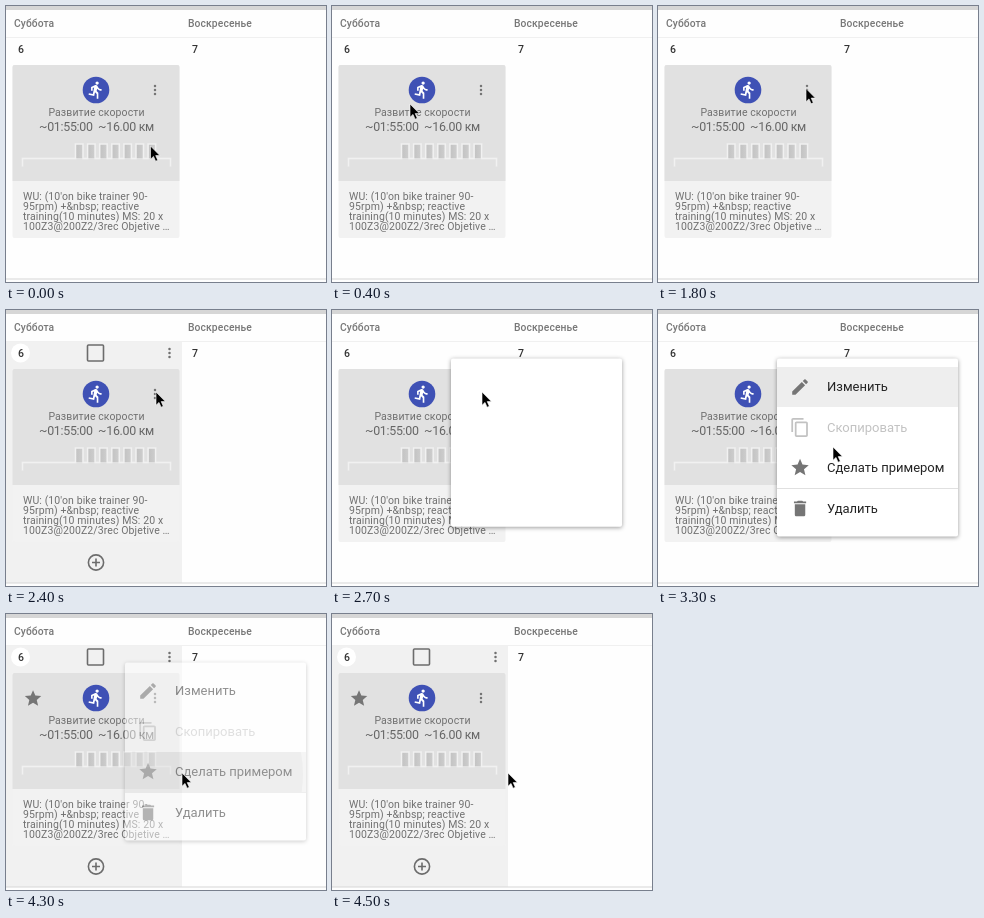
Animation, 320 px wide and 276 px high, one loop 4600 ms. Source, as an HTML page:

```html
<!DOCTYPE html>
<html lang="ru">
<head>
<meta charset="utf-8">
<title>Календарь тренировок</title>
<style>
html, body { margin: 0; width: 100%; height: 100%; overflow: hidden; background: #fefefe; }
svg { display: block; width: 320px; height: 276px; }
text { font-family: Roboto, "Open Sans", sans-serif; font-size: 10.5px; letter-spacing: .1px; fill: #707070; white-space: pre; }
.head { font-size: 10.3px; font-weight: 500; fill: #777; }
.day { font-weight: 500; fill: #333; }
.mid { text-anchor: middle; }
.time { font-size: 12.4px; letter-spacing: -.3px; fill: #666; }
#items text { font-size: 13px; letter-spacing: 0; fill: #242424; }
#items .off { fill: #c2c2c2; }
.icon { fill: #757575; }
#menuBox { filter: drop-shadow(0 1px 2px rgba(0,0,0,.4)); }
</style>
</head>
<body>
<svg viewBox="0 0 320 276">
  <defs>
    <path id="star" d="M12 17.27L18.18 21l-1.64-7.03L22 9.24l-7.19-.61L12 2 9.19 8.63 2 9.24l5.46 4.73L5.82 21z"/>
    <g id="dots"><circle cy="-4.1" r="1.25"/><circle r="1.25"/><circle cy="4.1" r="1.25"/></g>
    <clipPath id="row"><rect x="119" y="138" width="181" height="40"/></clipPath>
    <linearGradient id="barFill">
      <stop stop-color="#c2c2c2"/><stop offset="1" stop-color="#cecece"/>
    </linearGradient>
  </defs>

  <rect width="320" height="276" fill="#fefefe"/>
  <rect y="31" width="320" height="1" fill="#f0f0f0"/>
  <rect id="column" y="32" width="176" height="241" fill="#f1f1f1"/>
  <rect width="320" height="4" fill="#d6d6d6"/>
  <rect y="272.5" width="320" height="1" fill="#d8d8d8"/>
  <text class="head" x="8" y="21">Суббота</text>
  <text class="head" x="182" y="21">Воскресенье</text>
  <circle id="badge" cx="14.5" cy="43" r="9.5" fill="#fff"/>
  <text class="day" x="12" y="46.5">6</text>
  <text class="day" x="186" y="46.5">7</text>

  <g id="tools" fill="none" stroke="#6c6c6c" stroke-width="1.6">
    <rect x="81.5" y="35" width="16" height="16" rx="1"/>
    <use href="#dots" x="163.5" y="43" fill="#707070" stroke="none"/>
    <circle cx="90" cy="252.5" r="7.6"/>
    <path d="M86 252.5h8M90 248.5v8"/>
  </g>

  <rect x="6.5" y="59" width="167" height="173" rx="2" fill="#f2f2f2"/>
  <path d="M6.5 175V61q0-2 2-2H171.5q2 0 2 2V175z" fill="#e1e1e1"/>
  <circle cx="90" cy="84" r="13.3" fill="#3f51b5"/>
  <path transform="translate(80.2 74.2) scale(.81)" fill="#fff" d="M13.49 5.48c1.1 0 2-.9 2-2s-.9-2-2-2-2 .9-2 2 .9 2 2 2zm-3.6 13.9l1-4.4 2.1 2v6h2v-7.5l-2.1-2 .6-3c1.3 1.5 3.3 2.5 5.5 2.5v-2c-1.9 0-3.5-1-4.3-2.4l-1-1.6c-.4-.6-1-1-1.7-1-.3 0-.5.1-.8.1l-5.2 2.2v4.7h2v-3.4l1.8-.7-1.6 8.1-4.9-1-.4 2 7 1.4z"/>
  <circle id="ripple" cx="147" cy="84" r="18.5"/>
  <use href="#dots" x="149" y="84" class="icon"/>
  <use id="cardStar" href="#star" class="icon" transform="translate(17.2 74.5) scale(.82)"/>
  <text class="mid" x="90.5" y="110">Развитие скорости</text>
  <text class="mid time" x="90.5" y="125">~01:55:00  ~16.00 км</text>
  <g id="chart"></g>
  <g id="notes"></g>

  <g id="menu">
    <rect id="menuBox" x="119" y="48.5" width="181" height="178" rx="2" fill="#fff"/>
    <g id="items">
      <rect id="hoverEdit" x="119" y="57" width="181" height="40" fill="#eee"/>
      <rect id="hoverStar" x="119" y="138" width="181" height="40" fill="#eee"/>
      <g clip-path="url(#row)"><circle id="press" cx="177" cy="160" opacity=".06"/></g>
      <rect x="119" y="178" width="181" height="1" fill="#e0e0e0"/>
    </g>
  </g>
  <g id="cursor">
    <path id="arrow" fill="#000" stroke="#fff" stroke-width=".6" d="M0 0V13.2L3 10.4 5.1 15.2 7.3 14.3 5.2 9.6H9.4z"/>
    <path id="hand" fill="#fff" stroke="#111" stroke-width="1" stroke-linejoin="round" d="M-1.3 7V1Q0-.8 1.3 1V5.2Q2.7 4.2 3.7 5.8 5.2 4.9 6 6.5 7.8 6 8 8V11L6.3 15H-1.7L-5 10.3Q-5.3 8.2-3.4 8.6L-1.3 10.4zM1.3 5.2V8M3.7 5.8V8.4M6 6.5V8.8"/>
  </g>
</svg>
<script>
const LOOP = 4600, STEP = 100;
const NS = "http://www.w3.org/2000/svg";
const $ = id => document.getElementById(id);

function add(parent, tag, attrs, text) {
  const el = document.createElementNS(NS, tag);
  for (const key in attrs) el.setAttribute(key, attrs[key]);
  if (text) el.textContent = text;
  parent.append(el);
}

["WU: (10'on bike trainer 90-", "95rpm) +&nbsp; reactive", "training(10 minutes) MS: 20 x", "100Z3@200Z2/3rec Objetive …"]
  .forEach((line, i) => add($("notes"), "text", { x: 17, y: 193.5 + i * 10.1 }, line));

[
  ["Изменить", 77, "M3 17.25V21h3.75L17.81 9.94l-3.75-3.75L3 17.25zM20.71 7.04c.39-.39.39-1.02 0-1.41l-2.34-2.34c-.39-.39-1.02-.39-1.41 0l-1.83 1.83 3.75 3.75 1.83-1.83z"],
  ["Скопировать", 117.5, "M16 1H4c-1.1 0-2 .9-2 2v14h2V3h12V1zm3 4H8c-1.1 0-2 .9-2 2v14c0 1.1.9 2 2 2h11c1.1 0 2-.9 2-2V7c0-1.1-.9-2-2-2zm0 16H8V7h11v14z", "off"],
  ["Сделать примером", 157.5, $("star").getAttribute("d")],
  ["Удалить", 198.5, "M6 19c0 1.1.9 2 2 2h8c1.1 0 2-.9 2-2V7H6v12zM19 4h-3.5l-1-1h-5l-1 1H5v2h14V4z"]
].forEach(([label, y, d, off]) => {
  add($("items"), "path", { class: off || "icon", d, transform: `translate(131.6 ${y - 10.4}) scale(.87)` });
  add($("items"), "text", { class: off || "", x: 169, y: y + 4 }, label);
});

// Seven filled intervals under one light profile line.
const bars = Array.from({ length: 7 }, (_, i) => 69.5 + i * 12.1);
bars.forEach(x => add($("chart"), "rect", { x, y: 138, width: 7.5, height: 14, fill: "url(#barFill)" }));
add($("chart"), "path", {
  d: "M16.5 160.5V152.5H" + bars.map(x => `${x}V138H${x + 7.5}V152.5H`).join("") + "164.5V160.5",
  fill: "none", stroke: "#f1f1f1", "stroke-width": 1.5
});

// Linear interpolation over rows of [time, ...values].
function at(rows, t) {
  const i = rows.findIndex(row => row[0] > t);
  if (i === 0) return rows[0].slice(1);
  if (i < 0) return rows[rows.length - 1].slice(1);
  const a = rows[i - 1], b = rows[i], k = (t - a[0]) / (b[0] - a[0]);
  return a.slice(1).map((v, n) => v + (b[n + 1] - v) * k);
}

const path = [
  [0, 144.5, 140], [100, 172, 178], [200, 146, 199], [300, 92, 168], [400, 78, 98],
  [500, 112, 50], [600, 143, 100], [700, 144.5, 95], [900, 144.5, 90], [1200, 148, 82.5],
  [2300, 148, 82.5], [2400, 150, 82], [2700, 150, 82], [3200, 172, 126], [3300, 175, 137],
  [3500, 177, 159], [3600, 177, 159], [3700, 177, 162], [3800, 178, 160], [4100, 176, 159],
  [4300, 176, 159]
];
const glow = [[1800, 0], [1900, .06], [2000, 0]];
const menuScale = [[2700, .945], [2800, 1]];
const menuFade = [[4200, 1], [4300, .5]];
const itemFade = [[2700, 0], [3000, 1]];
const focusFade = [[3300, 1], [3500, 0]];
const pressSize = [[3800, 0], [4200, 120]];

const show = (id, on) => $(id).style.display = on ? "" : "none";
const set = (id, key, value) => $(id).setAttribute(key, value);

function draw(t) {
  const [x, y] = at(path, t);
  set("cursor", "transform", `translate(${x} ${y})`);
  const pointing = t >= 3400 && t < 4300;
  show("hand", pointing);
  show("arrow", !pointing);

  const hovered = (t >= 2200 && t < 2700) || t >= 4300;
  ["column", "badge", "tools"].forEach(id => show(id, hovered));
  show("cardStar", t >= 4300);
  set("ripple", "opacity", at(glow, t)[0]);

  show("menu", t >= 2700 && t < 4500);
  const s = at(menuScale, t)[0];
  set("menu", "transform", `translate(119 48.5) scale(${s}) translate(-119 -48.5)`);
  set("menu", "opacity", at(menuFade, t)[0]);
  set("items", "opacity", at(itemFade, t)[0]);
  const focus = at(focusFade, t)[0];
  set("hoverEdit", "opacity", focus);
  set("hoverStar", "opacity", 1 - focus);
  set("press", "r", at(pressSize, t)[0]);
}

function tick() {
  const t = performance.now() % LOOP;
  draw(Math.floor(t / STEP) * STEP);
  requestAnimationFrame(tick);
}
tick();
</script>
</body>
</html>
```
